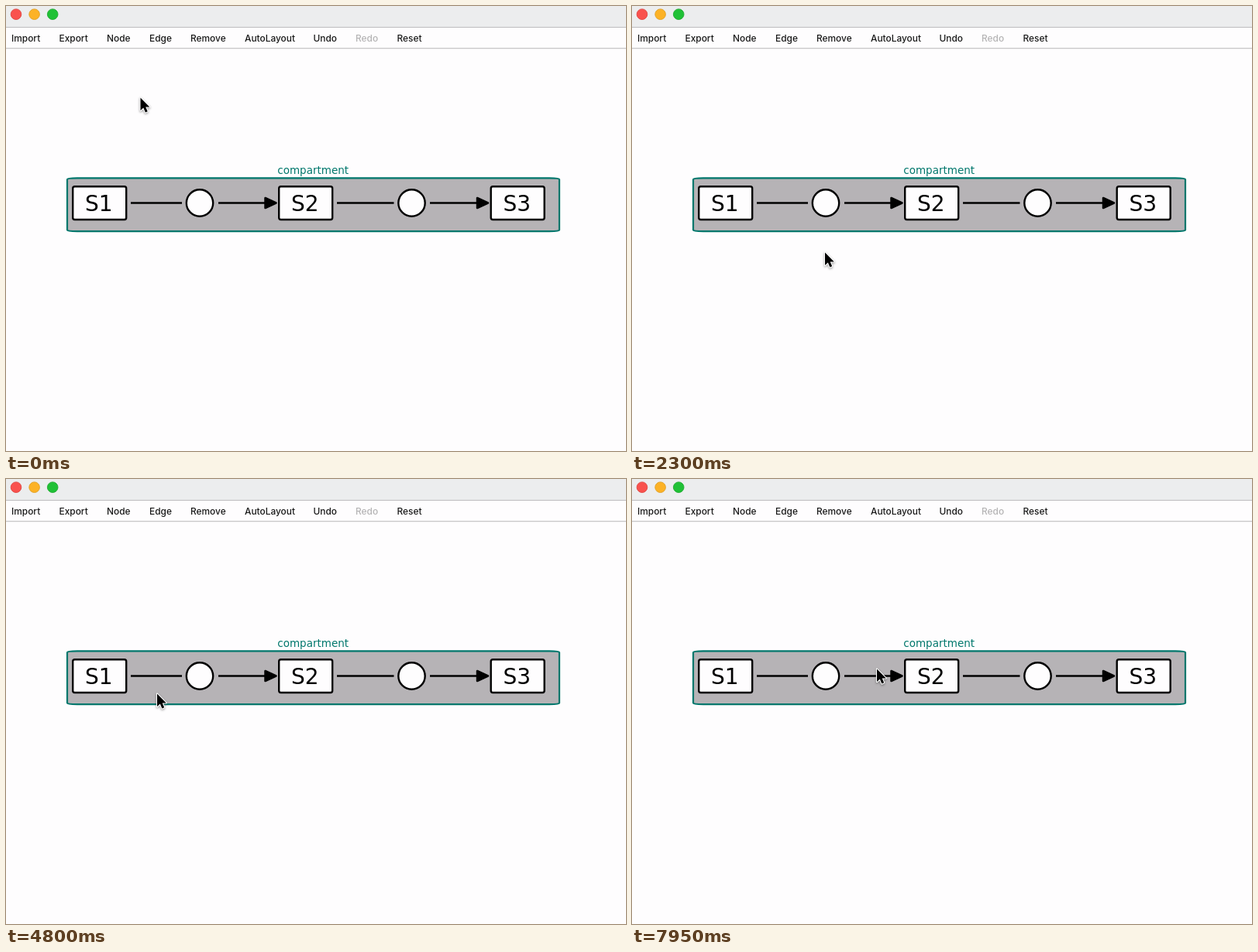
An HTML page with a canvas for the animation above (8000 ms loop, 800 px wide and 575 px high).

```html
<!DOCTYPE html>
<html lang="en">
<head>
<meta charset="utf-8">
<title>Network editor</title>
<style>
html, body { margin: 0; width: 100%; height: 100%; overflow: hidden; background: #fefdfe; }
canvas { display: block; width: 800px; height: 575px; }
</style>
</head>
<body>
<canvas id="stage" width="800" height="575"></canvas>
<script>
const ctx = document.getElementById('stage').getContext('2d');
const LOOP = 8000;
const UI = 'Inter, "Liberation Sans", sans-serif';
const GRAPH = '"DejaVu Sans", sans-serif';
const BLUE = '#3a5cdc', TEAL = '#00776c', PAPER = '#fefdfe';
const MID = 254.5;

const menus = [['Import', 7], ['Export', 68.5], ['Node', 130], ['Edge', 185], ['Remove', 238],
  ['AutoLayout', 308], ['Undo', 396.5], ['Redo', 451], ['Reset', 504.5]];
const species = [['S1', 86.2], ['S2', 352.2], ['S3', 625.7]];
const reactions = [{ x: 250, on: 2900, off: 4350 }, { x: 523.5, on: 3760, off: 4350 }];
const edges = [
  { a: 161, b: 227, on: 5640, off: 7050 },
  { a: 274, b: 350, arrow: true },
  { a: 427, b: 500.5, on: 6480, off: 7050 },
  { a: 547, b: 623.5, arrow: true }
];
const dialogs = [
  { open: 1600, close: 2190, text: 'Select the "Reaction" nodes on the Scene' },
  { open: 4400, close: 4750, text: 'Select the "Reactant" edges on the Scene' },
  { open: 7100, close: 7700, text: 'Select the "Product" edges on the Scene' }
];
// time, x, y of the pointer tip
const track = [[0, 173, 118], [600, 88, 42], [900, 88, 42], [1400, 91, 113.5], [1750, 91, 113.5],
  [2050, 246, 335], [2200, 246, 335], [2300, 248.5, 318], [2600, 248, 256], [3050, 248, 256],
  [3600, 523.5, 255], [4100, 523.5, 255], [4700, 196, 283], [4800, 194.5, 277], [5100, 194, 255],
  [5700, 194, 255], [6350, 462, 254], [6600, 462, 254], [7000, 482.5, 253], [7330, 482.5, 253],
  [7950, 315.5, 245]];

const smooth = u => u * u * (3 - 2 * u);
const clamp = u => Math.max(0, Math.min(1, u));
const within = (o, t) => t >= o.on && t < o.off;

function pointerAt(t) {
  let i = 0;
  while (i < track.length - 2 && t >= track[i + 1][0]) i++;
  const [t0, x0, y0] = track[i], [t1, x1, y1] = track[i + 1];
  const u = smooth(clamp((t - t0) / (t1 - t0)));
  return { x: x0 + (x1 - x0) * u, y: y0 + (y1 - y0) * u };
}

function text(s, x, y, font, color, align = 'left') {
  ctx.font = font;
  ctx.fillStyle = color;
  ctx.textAlign = align;
  ctx.fillText(s, x, y);
}

function box(x, y, w, h, r, fill, stroke, lw = 1) {
  ctx.beginPath();
  ctx.roundRect(x, y, w, h, r);
  paint(fill, stroke, lw);
}

function disc(x, y, r, fill, stroke, lw = 1) {
  ctx.beginPath();
  ctx.arc(x, y, r, 0, Math.PI * 2);
  paint(fill, stroke, lw);
}

function paint(fill, stroke, lw) {
  if (fill) { ctx.fillStyle = fill; ctx.fill(); }
  if (stroke) { ctx.strokeStyle = stroke; ctx.lineWidth = lw; ctx.stroke(); }
}

function shadow(color, blur, dy) {
  ctx.shadowColor = color;
  ctx.shadowBlur = blur;
  ctx.shadowOffsetY = dy;
}
const noShadow = () => shadow('transparent', 0, 0);

function drawChrome(active, menuOpen) {
  ctx.fillStyle = PAPER;
  ctx.fillRect(0, 0, 800, 575);
  ctx.fillStyle = active ? '#ecedee' : '#e1e2e3';
  ctx.fillRect(0, 0, 800, 27);
  ctx.fillStyle = '#bcbcbe';
  ctx.fillRect(0, 27, 800, 1);
  ctx.fillStyle = '#c8c7c8';
  ctx.fillRect(0, 54, 800, 1.3);
  const fills = active ? ['#f9524e', '#fcb226', '#20c136'] : ['#c6c6c7', '#c6c6c7', '#c6c6c7'];
  const rims = active ? ['#e0443f', '#e09f20', '#1aa92b'] : ['#a9a9aa', '#a9a9aa', '#a9a9aa'];
  fills.forEach((c, i) => disc(13 + i * 23.6, 10.7, 6.8, c, rims[i], 0.9));
  if (menuOpen) box(59, 28.5, 57, 25.5, 6, '#9b9a9b');
  for (const [name, x] of menus) {
    const color = name === 'Redo' ? '#b5b4b5' : menuOpen && name === 'Export' ? '#f4f3f4' : '#1a1a1a';
    text(name, x, 46.3, '500 11.9px ' + UI, color);
  }
}

function drawEdge(e, t) {
  const color = within(e, t) ? BLUE : '#000';
  ctx.strokeStyle = ctx.fillStyle = color;
  ctx.lineWidth = 2.5;
  ctx.beginPath();
  ctx.moveTo(e.a, MID);
  ctx.lineTo(e.arrow ? e.b - 14 : e.b, MID);
  ctx.stroke();
  if (!e.arrow) return;
  ctx.lineJoin = 'round';
  ctx.beginPath();
  ctx.moveTo(e.b - 1.5, MID);
  ctx.lineTo(e.b - 15.5, MID - 6.5);
  ctx.lineTo(e.b - 15.5, MID + 6.5);
  ctx.closePath();
  paint(color, color, 2.5);
  ctx.lineJoin = 'miter';
}

function drawGraph(t) {
  const l = 79, r = 714, top = 222.3, bot = 291.2;
  ctx.beginPath();
  ctx.moveTo(l, top + 1.7);
  ctx.quadraticCurveTo(l, top, l + 13, top);
  ctx.lineTo(r - 13, top);
  ctx.quadraticCurveTo(r, top, r, top + 1.7);
  ctx.lineTo(r, bot - 1.7);
  ctx.quadraticCurveTo(r, bot, r - 13, bot);
  ctx.lineTo(l + 13, bot);
  ctx.quadraticCurveTo(l, bot, l, bot - 1.7);
  ctx.closePath();
  paint('#b6b3b6', TEAL, 2.2);
  text('compartment', 396.2, 217, '13.5px ' + GRAPH, TEAL, 'center');
  edges.forEach(e => drawEdge(e, t));
  for (const n of reactions) disc(n.x, MID, 17.2, within(n, t) ? BLUE : PAPER, '#000', 2.4);
  for (const [name, x] of species) {
    box(x, 233.2, 69, 42.8, 2.5, PAPER, '#000', 2.4);
    text(name, x + 33.5, 265.3, '28px ' + GRAPH, '#000', 'center');
  }
}

function drawMenu() {
  shadow('rgba(0,0,0,0.35)', 16, 5);
  box(59, 54.5, 91.5, 154, 10, '#fcfbfc');
  noShadow();
  box(59, 54.5, 91.5, 154, 10, null, '#c4c3c4', 0.8);
  const font = '15px ' + UI;
  text('as JSON', 73.3, 89, font, '#1c1c1c');
  text('as SBML', 73.3, 124.5, font, '#b1b0b1');
  text('as PDF', 73.3, 186, font, '#1c1c1c');
  ctx.fillStyle = '#b2b1b2';
  ctx.fillRect(61, 147, 85, 1.7);
}

function drawAlertIcon() {
  const g = ctx.createLinearGradient(0, 60, 0, 126);
  g.addColorStop(0, '#ffffff');
  g.addColorStop(1, '#dcdbdc');
  shadow('rgba(0,0,0,0.3)', 4, 1);
  ctx.beginPath();
  ctx.ellipse(64, 90, 34, 29, 0, 0.95, Math.PI * 2 + 0.5);
  ctx.quadraticCurveTo(84, 118, 82, 126);
  ctx.quadraticCurveTo(70, 122, 66, 118);
  ctx.closePath();
  paint(g);
  noShadow();
  ctx.beginPath();
  ctx.moveTo(60, 72);
  ctx.quadraticCurveTo(64, 69, 68, 72);
  ctx.lineTo(65.8, 97);
  ctx.lineTo(62.2, 97);
  ctx.closePath();
  paint('#6b6a6b');
  disc(64, 104, 3.8, '#6b6a6b');
}

function drawDialog(d, t) {
  const u = clamp((t - d.open) / 175);
  const s = 0.38 + 0.62 * smooth(u);
  const w = 494, h = 192;
  ctx.save();
  ctx.globalAlpha = Math.min(1, 0.5 + u);
  ctx.translate(485.5, 380.3);
  ctx.scale(s, s);
  ctx.translate(-w / 2, -h / 2);
  shadow('rgba(0,0,0,0.42)', 56 * s, 22 * s);
  box(0, 0, w, h, 11, '#eeedee');
  noShadow();
  box(0, 0, w, 35, [11, 11, 0, 0], '#f5f4f5');
  box(0, 0, w, h, 11, null, '#cfcecf', 1);
  ['#f9625c', '#dcdbdc', '#dcdbdc'].forEach((c, i) => disc(14.5 + i * 23.7, 19, 7, c));
  drawAlertIcon();
  const font = '700 15.4px ' + UI;
  text(d.text, 118, 68.5, font, '#3c3b3c');
  text('and press return', 118, 87.5, font, '#3c3b3c');
  const g = ctx.createLinearGradient(0, 140, 0, 163);
  g.addColorStop(0, '#64aefa');
  g.addColorStop(1, '#3f92f4');
  box(377, 140, 79, 23, 5, g);
  text('OK', 416.5, 156.5, '14.5px ' + UI, '#fff', 'center');
  ctx.restore();
}

const arrowPath = new Path2D('M0 0V16.6L3.8 13L6.4 19L9.2 17.8L6.7 12H11.8Z');
const handPath = new Path2D('M3.2 3C3.2 .6 6.4 .3 7 2.6L8.6 8C9 6.6 11.4 6.8 11.8 8.4C12.6 7.4 14.4 8 14.6 9.2' +
  'C15.6 8.6 17.2 9.2 17.2 11V15C17 17 16 17.5 15.6 20H7.4C6.6 18 3 15.4 .8 12.2C-.4 10.2 2 9.2 3.6 10.8L5 12.2Z');
const knuckles = new Path2D('M8.8 13.2V17.2M11.2 13.2V17.2M13.6 13.2V17.2');

function drawPointer(p, hand) {
  ctx.save();
  ctx.lineJoin = 'round';
  if (hand) {
    ctx.translate(p.x - 4, p.y - 0.5);
    ctx.fillStyle = '#fff';
    ctx.fill(handPath);
    ctx.strokeStyle = '#000';
    ctx.lineWidth = 1.3;
    ctx.stroke(handPath);
    ctx.lineWidth = 1;
    ctx.stroke(knuckles);
  } else {
    ctx.translate(p.x + 0.5, p.y + 0.5);
    shadow('rgba(0,0,0,0.4)', 3, 1.2);
    ctx.strokeStyle = '#fff';
    ctx.lineWidth = 2.2;
    ctx.stroke(arrowPath);
    noShadow();
    ctx.fillStyle = '#000';
    ctx.fill(arrowPath);
  }
  ctx.restore();
}

function hovers(p) {
  return reactions.some(n => Math.hypot(p.x - n.x, p.y - MID) < 18) ||
    edges.some(e => p.x > e.a && p.x < e.b && Math.abs(p.y - MID) < 5) ||
    species.some(([, x]) => p.x > x && p.x < x + 69 && p.y > 233 && p.y < 276);
}

function draw(t) {
  const menuOpen = t >= 700 && t < 1580;
  const dialog = dialogs.find(d => t >= d.open && t < d.close);
  const p = pointerAt(t);
  drawChrome(!dialog, menuOpen);
  drawGraph(t);
  if (menuOpen) drawMenu();
  if (dialog) drawDialog(dialog, t);
  drawPointer(p, !dialog && hovers(p));
}

const start = performance.now();
function tick() {
  draw((performance.now() - start) % LOOP);
  requestAnimationFrame(tick);
}
tick();
</script>
</body>
</html>
```
